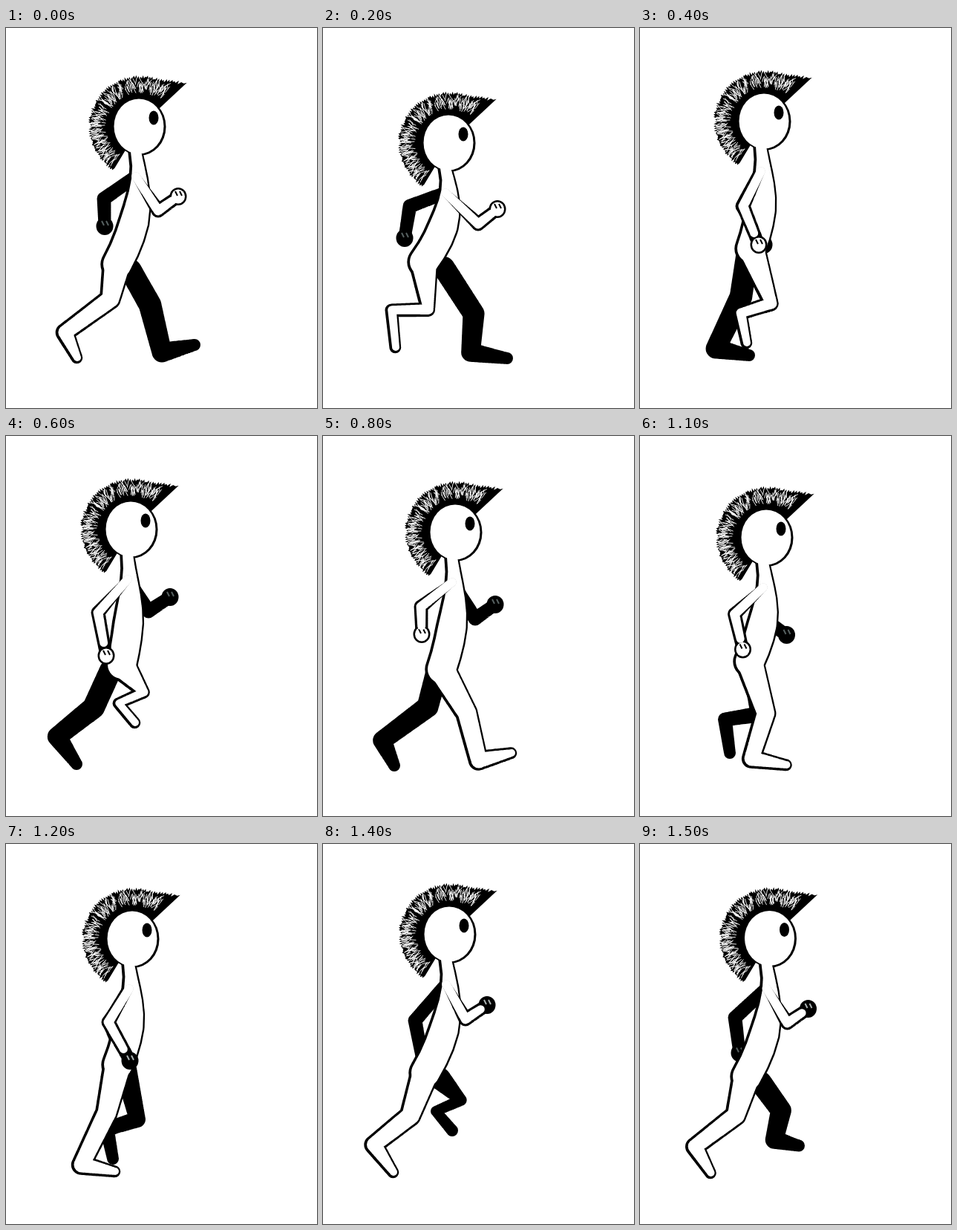
Animation of 419 by 512 pixels, one loop 1.6 s. Source, as an HTML page with a canvas:

```html
<!DOCTYPE html>
<html lang="en">
<head>
<meta charset="utf-8">
<title>Run cycle</title>
<style>
html, body { margin: 0; width: 100%; height: 100%; overflow: hidden; background: #fff; }
canvas { display: block; }
</style>
</head>
<body>
<canvas id="stage" width="419" height="512"></canvas>
<script>
const ctx = document.getElementById('stage').getContext('2d');
const TICKS = 16, TICK_MS = 100, INK = 3;

const points = text => text.split(' ').map(p => p.split(',').map(Number));
const mix = (a, b, k) => a + (b - a) * k;
const lerp = (p, q, k) => [mix(p[0], q[0], k), mix(p[1], q[1], k)];
const gap = (p, q) => Math.hypot(p[0] - q[0], p[1] - q[1]);

// One stride, a key every second tick: knee, ankle, toe, elbow, hand.
// Both sides follow it, half a cycle apart.
const stride = [
  '141,365 80,410 96,444 205,246 232,227',
  '142,379 93,380 98,430 209,264 235,244',
  '177,371 136,384 144,424 139,240 160,292',
  '186,345 152,360 174,386 124,238 135,296',
  '194,373 210,437 254,427 132,230 133,267',
  '203,385 199,437 248,445 117,240 110,283',
  '136,362 102,432 147,441 138,240 167,292',
  '118,366 69,405 95,442 192,236 221,217'
].map(points);

// Head centre and hip at the same ticks.
const body = [
  '180,133 150,318', '170,155 136,315', '168,126 150,297', '169,126 156,308',
  '179,130 160,314', '171,146 145,310', '171,128 151,297', '171,122 138,308'
].map(points);

function poseAt(keys, tick) {
  const i = Math.floor(tick / 2), next = keys[(i + 1) % keys.length];
  return keys[i % keys.length].map((p, n) => lerp(p, next[n], tick % 2 / 2));
}

function fill(path, color) {
  ctx.fillStyle = color;
  ctx.fill(path);
}
function oval(x, y, rx, ry, color) {
  const path = new Path2D();
  path.ellipse(x, y, rx, ry, 0, 0, 7);
  fill(path, color);
}
// Sweeps a circle of changing radius along the joints.
function limb(joints, radii, grow, color) {
  const path = new Path2D(), steps = 24;
  for (let i = 0; i < joints.length - 1; i++) {
    for (let s = 0; s <= steps; s++) {
      const [x, y] = lerp(joints[i], joints[i + 1], s / steps);
      const r = mix(radii[i], radii[i + 1], s / steps) + grow;
      path.moveTo(x + r, y);
      path.arc(x, y, r, 0, 2 * Math.PI);
    }
  }
  fill(path, color);
}

// A bent leg is drawn thinner than a straight one.
function legRadii(hip, [knee, ankle], hipRadius) {
  const straight = gap(hip, ankle) / (gap(hip, knee) + gap(knee, ankle));
  const r = 18 * straight - 5.5;
  return [hipRadius, r, r * 0.85, 5];
}

function spine(neck, hip) {
  const bend = [neck[0] + 6 + 0.4 * (neck[0] - hip[0]), (neck[1] + hip[1]) / 2];
  const joints = [], radii = [];
  for (let t = 0; t <= 1; t += 0.125) {
    const k = Math.min(1, t / 0.7);
    joints.push(lerp(lerp(neck, bend, t), lerp(bend, hip, t), t));
    radii.push(7 + 12 * k * k * (3 - 2 * k));
  }
  return [joints, radii];
}

function fist([x, y], dark, lines) {
  oval(x, y, 11.5, 12, '#000');
  if (!dark) oval(x, y, 9, 9.5, '#fff');
  ctx.lineWidth = 2;
  ctx.strokeStyle = lines;
  ctx.beginPath();
  for (const dx of [-4, 2]) {
    ctx.moveTo(x + dx, y - 7);
    ctx.lineTo(x + dx + 3, y - 1);
  }
  ctx.stroke();
}

// Mohawk: a fan around the head, longer towards its front tip.
let seed = 7;
const random = () => (seed = seed * 16807 % 2147483647) / 2147483647;
function hairPoint(u, depth) {
  const angle = -0.75 - u * 3.42;
  const tip = 68 + 19 * Math.max(0, 1 - 6 * u) ** 2;
  const r = mix(35, tip, depth);
  return [r * Math.cos(angle), r * Math.sin(angle)];
}
const crest = new Path2D(), strands = new Path2D();
crest.moveTo(...hairPoint(0, 0));
for (let i = 0; i <= 150; i++) {
  crest.lineTo(...hairPoint(i / 150, i ? 0.88 + i % 2 * 0.08 + random() * 0.1 : 1));
}
for (let u = 1; u >= 0; u -= 0.05) crest.lineTo(...hairPoint(u, 0));
for (let i = 0; i < 260; i++) {
  const u = 0.05 + random() * 0.93, start = 0.3 + random() * 0.45;
  strands.moveTo(...hairPoint(u, start));
  strands.lineTo(...hairPoint(u + (random() - 0.5) * 0.05, Math.min(0.94, start + 0.15 + random() * 0.25)));
}
function drawHair(x, y) {
  ctx.save();
  ctx.translate(x, y);
  fill(crest, '#000');
  ctx.lineWidth = 0.9;
  ctx.strokeStyle = '#fff';
  ctx.stroke(strands);
  ctx.restore();
}

function draw(tick) {
  const [head, hip] = poseAt(body, tick);
  const near = poseAt(stride, tick), far = poseAt(stride, tick + TICKS / 2);
  const [x, y] = head;
  const neck = [x - 5, y + 34], shoulder = [x - 5, y + 67];
  const farHip = [hip[0] + 0.4 * (far[0][0] - hip[0]), hip[1] + 8];
  const armRadii = [6, 6.5, 5.5];

  ctx.fillStyle = '#fff';
  ctx.fillRect(0, 0, 419, 512);

  limb([farHip, ...far.slice(0, 3)], legRadii(farHip, far, 12), INK, '#000');
  limb([shoulder, ...far.slice(3)], armRadii, INK, '#000');
  fist(far[4], true, '#566060');
  drawHair(x, y);

  // Ink first, then paper, so that joined parts share one outline.
  const parts = [
    spine(neck, hip),
    [[hip, ...near.slice(0, 3)], legRadii(hip, near, 17)]
  ];
  ctx.save();
  ctx.translate(-0.7, 0.3);
  for (const [joints, radii] of parts) limb(joints, radii, INK, '#000');
  ctx.restore();
  oval(x, y, 35.5, 39, '#000');
  for (const [joints, radii] of parts) limb(joints, radii, 0, '#fff');
  oval(x - 1, y - 0.5, 33.5, 37, '#fff');
  oval(x + 19, y - 12, 6.5, 9.5, '#000');

  const arm = [shoulder, ...near.slice(3)], gloved = tick > 11;
  limb(arm, [5.5, 9.5, 8.5], 0, '#000');
  fist(near[4], gloved, gloved ? '#a9b0b0' : '#000');
  limb(arm.slice(0, 2).concat([lerp(arm[1], arm[2], 0.7)]), armRadii, 0, '#fff');
}

function frame(now) {
  draw(Math.floor(now / TICK_MS) % TICKS);
  requestAnimationFrame(frame);
}
frame(0);
</script>
</body>
</html>
```
